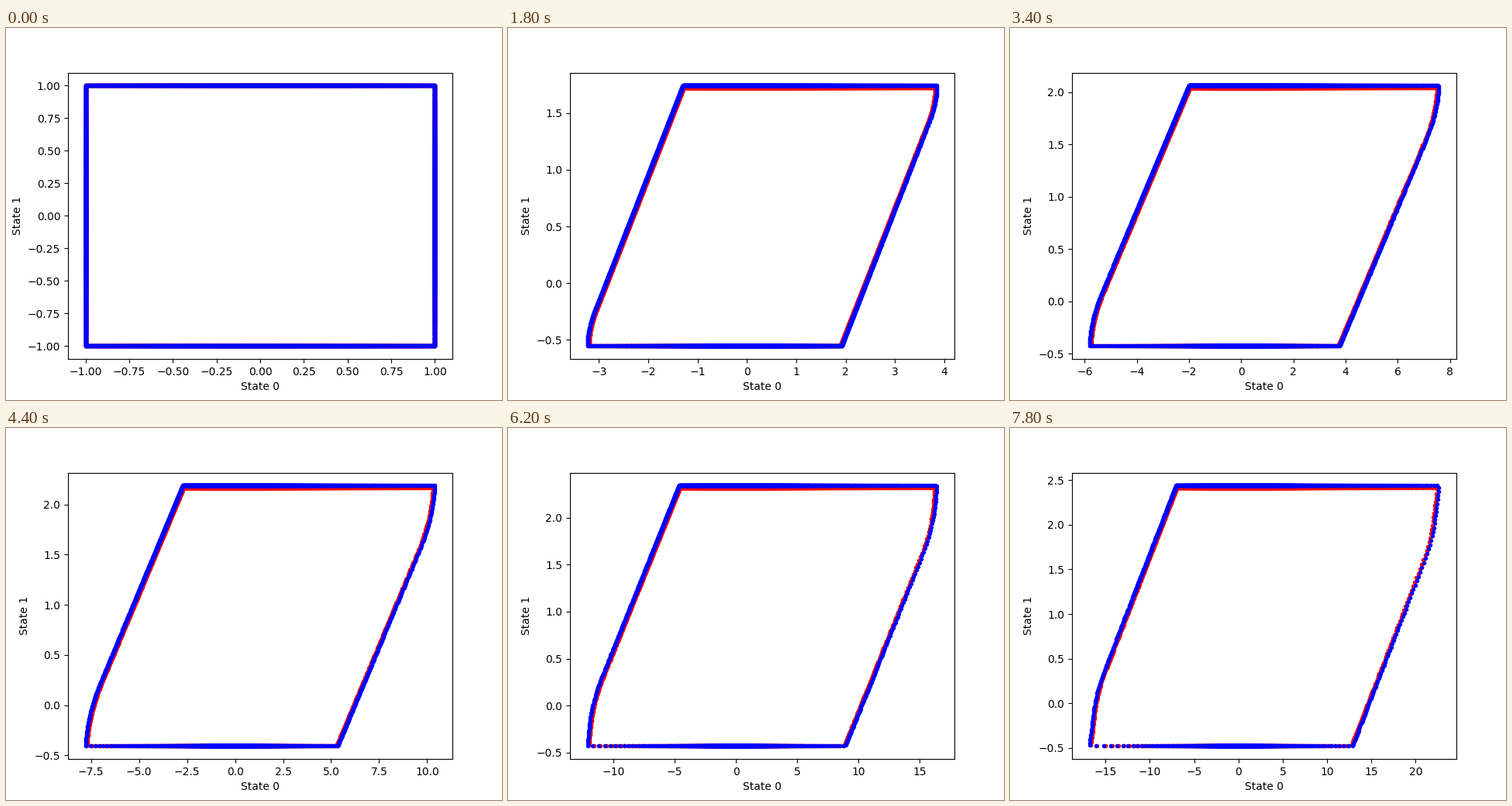
A matplotlib script for the animation above (8 s loop, 640 px wide and 480 px high).

```python
import numpy as np
import matplotlib.pyplot as plt
from matplotlib.animation import FuncAnimation

FRAMES, STEP = 40, 0.1
HALF_W, HALF_H = 225, 168          # half extent of the set on screen, px
ANGLES = np.radians(np.arange(-1800, 1800) / 10)
RAYS = np.column_stack([np.cos(ANGLES), np.sin(ANGLES)])


def cross(a, b):
    return a[:, 0] * b[:, 1] - a[:, 1] * b[:, 0]


def right_side(n, ratio):
    """Right edge in unit box coordinates, lower corner to upper corner."""
    low = np.array([[ratio, -1.0]])
    high = np.array([[1.0, 1.0]])
    if n == 0:
        return np.vstack([low, high])
    lean = 0.0036 * max(0, n - 5)
    over = 21 * (1 - np.exp(-n / 18))
    slope = (HALF_W * (1 - ratio) + over) / (2 * HALF_H)
    bend = over / (slope - lean)
    reach = min(bend, 60 - 0.85 * n)

    # rounded bend between the diagonal and the steep upper part
    start = np.array([HALF_W + over - slope * (bend + reach), bend + reach])
    mid = np.array([HALF_W - lean * bend, bend])
    end = np.array([HALF_W - lean * (bend - reach), bend - reach])
    q = np.linspace(0, 1, 14)[:, None]
    curve = (1 - q) ** 2 * start + 2 * q * (1 - q) * mid + q ** 2 * end
    curve = np.column_stack([curve[:, 0] / HALF_W, 1 - curve[:, 1] / HALF_H])
    if bend - reach < 1e-6:
        curve = curve[:-1]
    return np.vstack([low, curve, high])


def outline(n):
    t = n * STEP
    decay = 1 - np.exp(-t)
    center = np.array([t - decay, decay])
    width = 1 + 2.23 * t + 0.66 * t ** 2
    inner = 1 + 0.19 * t + 0.54 * t ** 2
    height = 1 + 0.0879 * t + 0.1172 * decay
    side = right_side(n, inner / width)
    return center + np.vstack([side, -side]) * [width, height]


def boundary(n):
    """Points where evenly spaced rays from the origin meet the outline."""
    poly = outline(n)
    theta = np.arctan2(poly[:, 1], poly[:, 0])
    order = np.argsort(theta)
    poly, theta = poly[order], theta[order]
    k = (np.searchsorted(theta, ANGLES, side="right") - 1) % len(poly)
    p = poly[k]
    edge = poly[(k + 1) % len(poly)] - p
    return RAYS * (cross(p, edge) / cross(RAYS, edge))[:, None]


fig, ax = plt.subplots(figsize=(6.4, 4.8), dpi=100)


def draw(n):
    ax.clear()
    pts = boundary(n)
    scale = 0.99 if n else 1
    ax.plot(*(scale * pts).T, "r.")
    ax.plot(*pts.T, "b.")
    ax.set_xlabel("State 0")
    ax.set_ylabel("State 1")
    return ax.lines


anim = FuncAnimation(fig, draw, frames=FRAMES, interval=200,
                     init_func=lambda: draw(0), repeat=True, repeat_delay=0)
plt.show()
```
